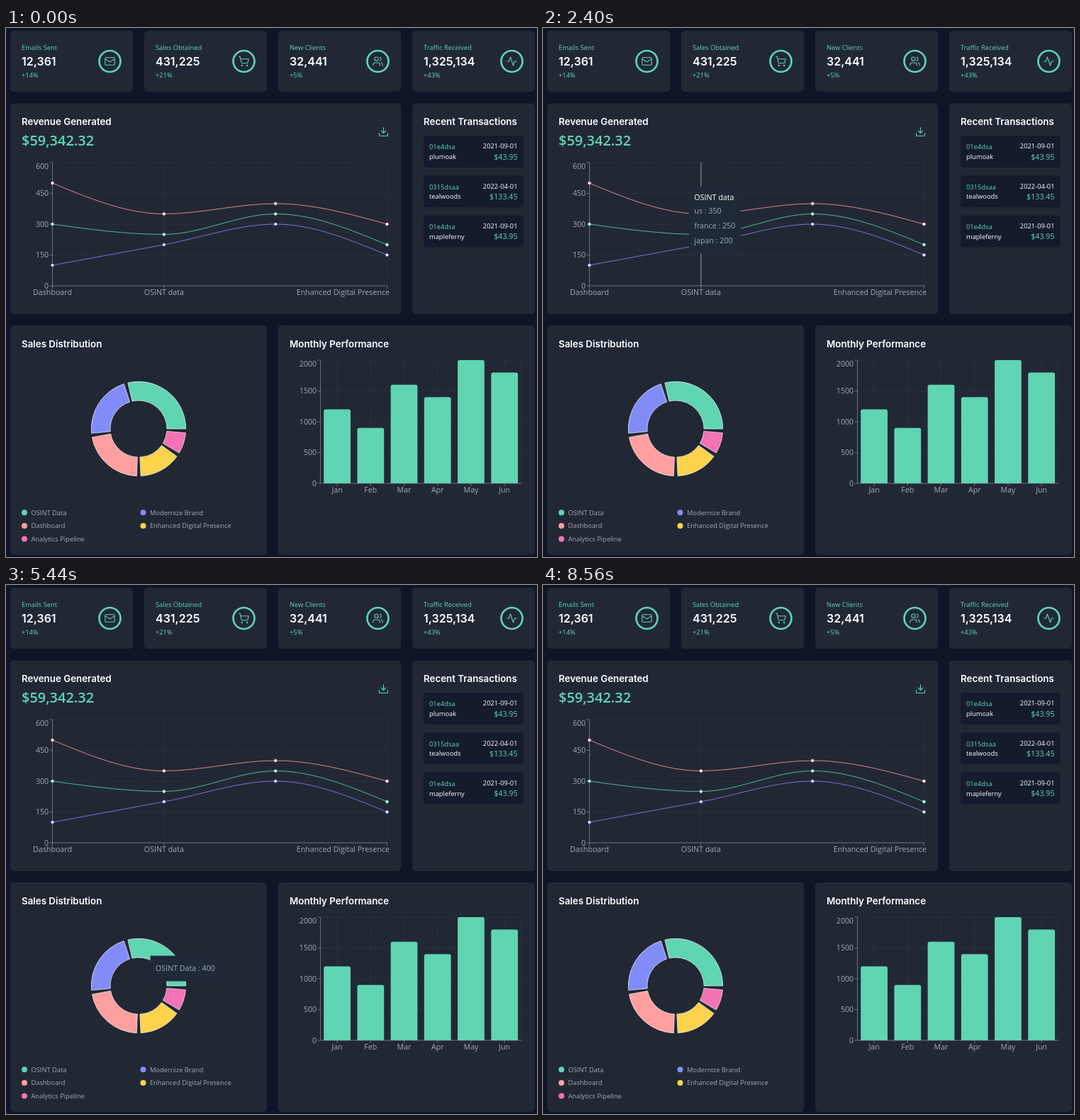
Write an HTML page with a canvas that moves like this. It is 749 by 747 pixels and loops after 8.88 s.

```html
<!DOCTYPE html>
<html lang="en">
<head>
<meta charset="utf-8">
<title>Dashboard</title>
<style>
  html, body { margin: 0; width: 100%; height: 100%; overflow: hidden; background: #0e1526; }
  canvas { display: block; width: 749px; height: 747px; }
</style>
</head>
<body>
<canvas id="stage"></canvas>
<script>
const W = 749, H = 747, LOOP = 8880, SLIDE = 400, U = 2 / 3;
const GREEN = '#5fd5b3', BLUE = '#818cf8', RED = '#ff9f9f', YELLOW = '#fcd34d', PINK = '#f472b6';
const CARD = '#212834', ROW = '#141b2c', TIP = '#1f2937', GRAY = '#a3a9b3', AXIS = '#8d949f', GRID = '#3a424f';
const BODY = '"Open Sans", sans-serif', HEAD = 'Inter, sans-serif';
const SMALL = 14 * U, BASE = 16 * U;

const canvas = document.getElementById('stage');
const ctx = canvas.getContext('2d');
const ratio = window.devicePixelRatio || 1;
canvas.width = W * ratio;
canvas.height = H * ratio;
ctx.scale(ratio, ratio);

// ---- data ----
const stats = [
  ['Emails Sent', '12,361', '+14%', 'M4 4H20a2 2 0 0 1 2 2V18a2 2 0 0 1-2 2H4a2 2 0 0 1-2-2V6a2 2 0 0 1 2-2zM22 7l-8.97 5.7a1.94 1.94 0 0 1-2.06 0L2 7'],
  ['Sales Obtained', '431,225', '+21%', 'M7 21a1 1 0 0 0 2 0a1 1 0 0 0-2 0M18 21a1 1 0 0 0 2 0a1 1 0 0 0-2 0M2.05 2.05h2l2.66 12.42a2 2 0 0 0 2 1.58h9.78a2 2 0 0 0 1.95-1.57l1.65-7.43H5.12'],
  ['New Clients', '32,441', '+5%', 'M16 21v-2a4 4 0 0 0-4-4H6a4 4 0 0 0-4 4v2M5 7a4 4 0 0 0 8 0a4 4 0 0 0-8 0M22 21v-2a4 4 0 0 0-3-3.87M16 3.13a4 4 0 0 1 0 7.75'],
  ['Traffic Received', '1,325,134', '+43%', 'M22 12h-4l-3 9L9 3l-3 9H2'],
];
const DOWNLOAD = 'M21 15v4a2 2 0 0 1-2 2H5a2 2 0 0 1-2-2v-4M7 10l5 5 5-5M12 15V3';
const transactions = [
  ['01e4dsa', 'plumoak', '2021-09-01', '$43.95'],
  ['0315dsaa', 'tealwoods', '2022-04-01', '$133.45'],
  ['01e4dsa', 'mapleferny', '2021-09-01', '$43.95'],
];
const stages = ['Dashboard', 'OSINT data', 'Modernize Brand', 'Enhanced Digital Presence'];
const series = [
  { name: 'us', color: RED, values: [500, 350, 400, 300] },
  { name: 'france', color: GREEN, values: [300, 250, 350, 200] },
  { name: 'japan', color: BLUE, values: [100, 200, 300, 150] },
];
const months = ['Jan', 'Feb', 'Mar', 'Apr', 'May', 'Jun'];
const sales = [1200, 900, 1600, 1400, 2000, 1800];
const slices = [
  ['OSINT Data', 400, GREEN], ['Modernize Brand', 300, BLUE], ['Dashboard', 300, RED],
  ['Enhanced Digital Presence', 200, YELLOW], ['Analytics Pipeline', 100, PINK],
];

// ---- geometry ----
const line = { left: 65.5, right: 537.5, top: 190, bottom: 364, max: 600 };
const bars = { left: 443.5, right: 726.8, top: 469, bottom: 643, max: 2000 };
const pie = { x: 187, y: 566, outer: 100 * U, inner: 60 * U };
const band = (bars.right - bars.left) / 6;
const lineX = i => line.left + (line.right - line.left) * i / 3;
const barX = i => bars.left + band * (i + 0.5);
const plotY = (plot, v) => plot.bottom - (plot.bottom - plot.top) * v / plot.max;

const PAD = 5, total = slices.reduce((sum, s) => sum + s[1], 0);
let angle = 0;
const sectors = slices.map(([, value]) => {
  const from = angle, to = from + (360 - PAD * slices.length) * value / total;
  angle = to + PAD;
  return [-from * Math.PI / 180, -to * Math.PI / 180];
});

// ---- drawing helpers ----
function text(str, x, midY, { size = SMALL, color = GRAY, weight = 400, align = 'left', family = BODY } = {}) {
  ctx.font = `${weight} ${size}px ${family}`;
  ctx.fillStyle = color;
  ctx.textAlign = align;
  ctx.fillText(str, x, midY + size * 0.36);
}
const title = (str, x, y) => text(str, x, y, { size: 20 * U, color: '#fff', weight: 600, family: HEAD });

function box(x, y, w, h, radius, color) {
  ctx.fillStyle = color;
  ctx.beginPath();
  ctx.roundRect(x, y, w, h, radius);
  ctx.fill();
}
function segment(x1, y1, x2, y2, color, dash = []) {
  ctx.strokeStyle = color;
  ctx.lineWidth = U;
  ctx.setLineDash(dash);
  ctx.beginPath();
  ctx.moveTo(x1, y1);
  ctx.lineTo(x2, y2);
  ctx.stroke();
  ctx.setLineDash([]);
}
function dot(x, y, r, fill, stroke, width) {
  ctx.beginPath();
  ctx.arc(x, y, r, 0, 7);
  ctx.fillStyle = fill;
  ctx.fill();
  if (!stroke) return;
  ctx.strokeStyle = stroke;
  ctx.lineWidth = width;
  ctx.stroke();
}
function icon(path, x, y) {
  ctx.save();
  ctx.translate(x - 12 * U, y - 12 * U);
  ctx.scale(U, U);
  ctx.strokeStyle = GREEN;
  ctx.lineWidth = 1.6;
  ctx.lineCap = ctx.lineJoin = 'round';
  ctx.stroke(new Path2D(path));
  ctx.restore();
}

function grid(plot, columns) {
  for (let i = 0; i <= 4; i++) {
    const y = plotY(plot, plot.max * i / 4);
    segment(plot.left, y, plot.right, y, GRID, [2, 2]);
  }
  for (const x of columns) segment(x, plot.top, x, plot.bottom, GRID, [2, 2]);
}
function axes(plot, ticks) {
  segment(plot.left, plot.top, plot.left, plot.bottom, AXIS);
  segment(plot.left, plot.bottom, plot.right, plot.bottom, AXIS);
  for (const x of ticks) segment(x, plot.bottom, x, plot.bottom + 4, AXIS);
  for (let i = 0; i <= 4; i++) {
    const value = plot.max * i / 4, y = plotY(plot, value);
    segment(plot.left - 4, y, plot.left, y, AXIS);
    text(value, plot.left - 5.3, i === 4 ? y + 5 : y, { size: BASE, align: 'right' });
  }
}

// Monotone cubic curve through evenly spaced points
function curve(xs, ys, color) {
  const n = xs.length - 1, step = xs[1] - xs[0];
  const d = ys.slice(1).map((y, i) => (y - ys[i]) / step);
  const m = ys.map((_, i) => i > 0 && i < n
    ? (Math.sign(d[i - 1]) + Math.sign(d[i])) *
      Math.min(Math.abs(d[i - 1]), Math.abs(d[i]), Math.abs(d[i - 1] + d[i]) / 4)
    : 0);
  m[0] = (3 * d[0] - m[1]) / 2;
  m[n] = (3 * d[n - 1] - m[n - 1]) / 2;
  ctx.beginPath();
  ctx.moveTo(xs[0], ys[0]);
  for (let i = 0; i < n; i++) {
    const k = step / 3;
    ctx.bezierCurveTo(xs[i] + k, ys[i] + m[i] * k, xs[i + 1] - k, ys[i + 1] - m[i + 1] * k, xs[i + 1], ys[i + 1]);
  }
  ctx.strokeStyle = color;
  ctx.lineWidth = 0.8;
  ctx.stroke();
}

// ---- panels ----
function drawStats() {
  stats.forEach(([label, value, change, path], i) => {
    const x = 6 + 189 * i;
    box(x, 4, 173, 86, 5, CARD);
    text(label, x + 16, 27.5, { color: GREEN });
    text(value, x + 16, 47.2, { size: 16, color: '#fff', weight: 600, family: HEAD });
    text(change, x + 16, 67, { color: GREEN });
    ctx.beginPath();
    ctx.arc(x + 140.5, 47, 15, 0, 7);
    ctx.strokeStyle = GREEN;
    ctx.lineWidth = 2.67;
    ctx.stroke();
    icon(path, x + 140.5, 47);
  });
}

function drawTransactions() {
  box(573, 106.5, 173, 297.5, 5, CARD);
  title('Recent Transactions', 589, 131.7);
  transactions.forEach(([id, user, date, amount], i) => {
    const y = 152 + 56.2 * i;
    box(589, y, 141, 45, 4, ROW);
    text(id, 597, y + 16, { color: GREEN });
    text(user, 597, y + 29.8, { color: '#fff' });
    text(date, 721.5, y + 15, { color: '#fff', align: 'right' });
    text(amount, 721.5, y + 29.8, { size: BASE, color: GREEN, align: 'right' });
  });
}

function drawLines(active) {
  box(6, 106.5, 551, 297.5, 5, CARD);
  title('Revenue Generated', 22, 131.7);
  text('$59,342.32', 22, 159, { size: 20, color: GREEN, weight: 600 });
  icon(DOWNLOAD, 532.5, 146.5);

  const xs = stages.map((_, i) => lineX(i)), shown = [xs[0], xs[1], xs[3]];
  grid(line, shown);
  axes(line, shown);
  const label = { size: BASE, align: 'center' };
  text(stages[0], xs[0], 373.5, label);
  text(stages[1], xs[1], 373.5, label);
  text(stages[3], 541, 373.5, { size: BASE, align: 'right' });

  if (active >= 0) segment(xs[active], line.top, xs[active], line.bottom, '#ccc');
  for (const { color, values } of series) {
    const ys = values.map(v => plotY(line, v));
    curve(xs, ys, color);
    xs.forEach((x, i) => dot(x, ys[i], 2, '#fff', color, U));
    if (active >= 0) dot(xs[active], ys[active], 4 * U, color, '#fff', 2 * U);
  }
}

function drawPie() {
  box(6, 420, 362, 324, 5, CARD);
  title('Sales Distribution', 22, 445.7);
  sectors.forEach(([from, to], i) => {
    ctx.beginPath();
    ctx.arc(pie.x, pie.y, pie.outer, from, to, true);
    ctx.arc(pie.x, pie.y, pie.inner, to, from);
    ctx.closePath();
    ctx.fillStyle = slices[i][2];
    ctx.fill();
    ctx.strokeStyle = '#fff';
    ctx.lineWidth = U;
    ctx.stroke();
  });
  slices.forEach(([name, , color], i) => {
    const x = 26 + 167.5 * (i % 2), y = 684.2 + 18.7 * Math.floor(i / 2);
    dot(x, y, 4, color);
    text(name, x + 9.4, y);
  });
}

function drawBars(active) {
  box(384, 420, 362, 324, 5, CARD);
  title('Monthly Performance', 400, 445.7);
  const centers = months.map((_, i) => barX(i));
  grid(bars, [...centers, bars.right]);
  if (active >= 0) box(centers[active] - band / 2, bars.top, band, bars.bottom - bars.top, 0, '#ccc');
  sales.forEach((value, i) => {
    const y = plotY(bars, value), w = band * 0.8;
    box(centers[i] - w / 2, y, w, bars.bottom - y, [4 * U, 4 * U, 0, 0], GREEN);
  });
  axes(bars, centers);
  months.forEach((name, i) => text(name, centers[i], 652.5, { size: BASE, align: 'center' }));
}

// ---- tooltips ----
const charts = {
  bars: {
    origin: [400, 465.7], right: bars.right,
    anchor: i => [barX(i), 541.4],
    content: i => [months[i], [`value : ${sales[i]}`]],
  },
  line: {
    origin: [22, 186.7], right: line.right,
    anchor: i => [lineX(i), 222],
    content: i => [stages[i], series.map(s => `${s.name} : ${s.values[i]}`)],
  },
  pie: {
    origin: [22, 466], right: 352,
    anchor: i => {
      const mid = (sectors[i][0] + sectors[i][1]) / 2, r = (pie.outer + pie.inner) / 2;
      return [pie.x + r * Math.cos(mid), pie.y + r * Math.sin(mid)];
    },
    content: i => ['', [`${slices[i][0]} : ${slices[i][1]}`]],
  },
};
const hovers = [
  [160, 960, 'bars', 0], [960, 1680, 'bars', 2], [1680, 2160, 'bars', 4],
  [2160, 2800, 'line', 1], [2800, 3360, 'line', 2], [3360, 4240, 'line', 3],
  [5200, 5840, 'pie', 0], [5840, 6480, 'pie', 4], [6480, 7120, 'pie', 3],
  [7120, 7680, 'pie', 2], [7760, 8400, 'pie', 1],
];

function tipWidth(chart, i) {
  const [label, items] = chart.content(i);
  ctx.font = `400 ${BASE}px ${BODY}`;
  return Math.max(...[label, ...items].map(s => ctx.measureText(s).width)) + 22 * U;
}
// Sits right of the anchor, or left of it where the chart ends
function tipPlace(chart, i) {
  const [x, y] = chart.anchor(i), gap = 10 * U, w = tipWidth(chart, i);
  const left = x + gap + w > chart.right ? Math.max(x - gap - w, chart.origin[0]) : x + gap;
  return [left, y + gap];
}

// cubic-bezier(.25, .1, .25, 1)
function ease(p) {
  if (p >= 1) return 1;
  let lo = 0, hi = 1;
  const at = (s, a, b) => 3 * a * s * (1 - s) ** 2 + 3 * b * s * s * (1 - s) + s ** 3;
  for (let k = 0; k < 20; k++) {
    const s = (lo + hi) / 2;
    if (at(s, 0.25, 0.25) < p) lo = s; else hi = s;
  }
  return at(lo, 0.1, 1);
}

function drawTip(k, t) {
  const [start, , name, i] = hovers[k], chart = charts[name], before = hovers[k - 1];
  const from = before && before[2] === name ? tipPlace(chart, before[3]) : chart.origin;
  const to = tipPlace(chart, i), p = ease((t - start) / SLIDE);
  const x = from[0] + (to[0] - from[0]) * p, y = from[1] + (to[1] - from[1]) * p;
  const [label, items] = chart.content(i);
  const head = label ? 16 : 0, row = 32 * U;
  box(x, y, tipWidth(chart, i), 22 * U + head + row * items.length, 0, TIP);
  if (label) text(label, x + 11 * U, y + 15.5, { size: BASE, color: '#fff' });
  items.forEach((item, j) => text(item, x + 11 * U, y + 18 + head + row * j, { size: BASE }));
}

function frame(now) {
  const t = now % LOOP;
  const k = hovers.findIndex(([start, end]) => t >= start && t < end);
  const active = name => k >= 0 && hovers[k][2] === name ? hovers[k][3] : -1;
  ctx.fillStyle = '#0e1526';
  ctx.fillRect(0, 0, W, H);
  drawStats();
  drawLines(active('line'));
  drawTransactions();
  drawPie();
  drawBars(active('bars'));
  if (k >= 0) drawTip(k, t);
}

const begin = performance.now();
function loop() {
  frame(performance.now() - begin);
  requestAnimationFrame(loop);
}
loop();
</script>
</body>
</html>
```
